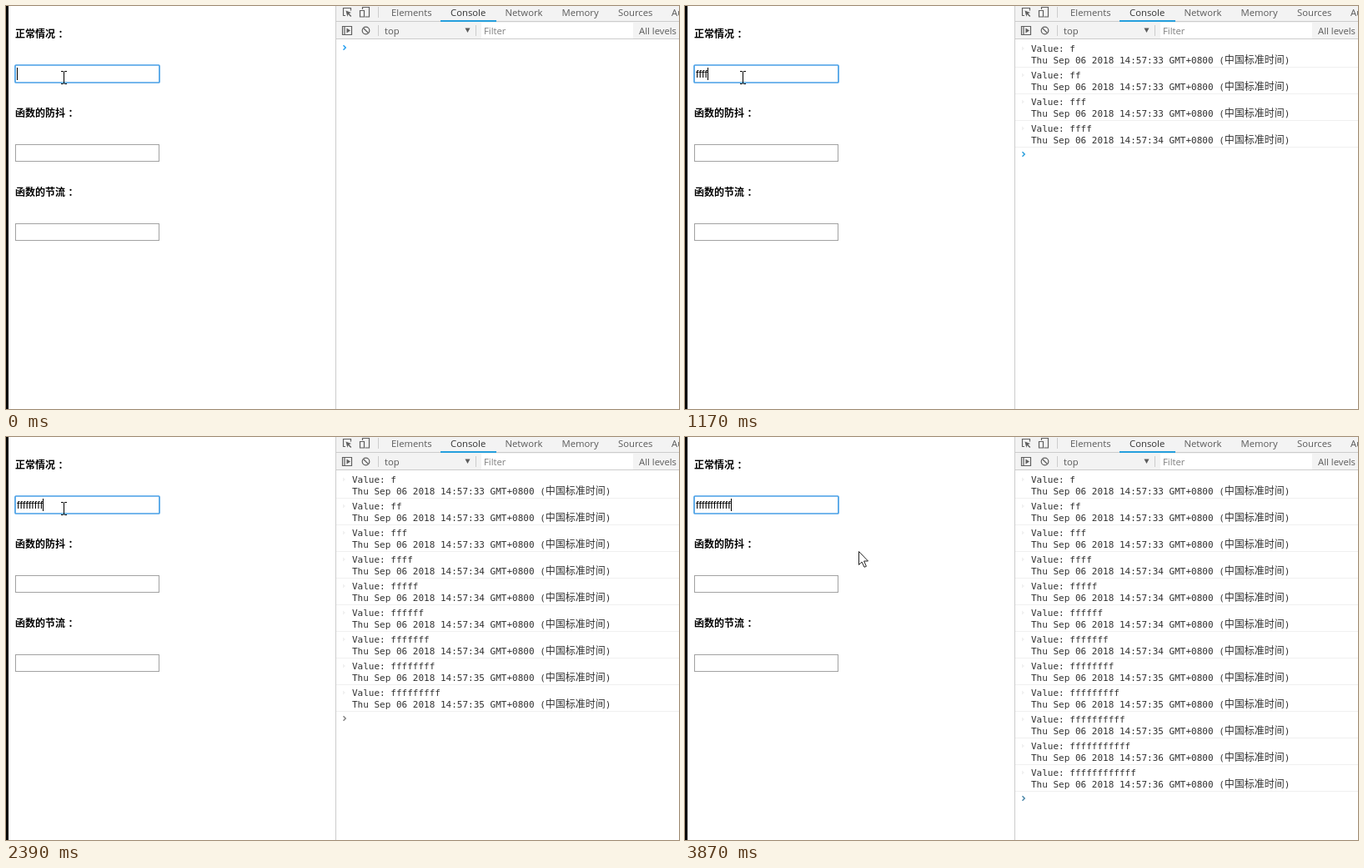
An HTML page that plays this animation: 807x484 px, repeating every 3940 ms.

```html
<!DOCTYPE html>
<html lang="zh-CN">
<head>
<meta charset="utf-8">
<style>
  html, body { margin: 0; width: 100%; height: 100%; overflow: hidden; background: #fff; }
  svg { display: block; }
  text { white-space: pre; }
  .head { font: bold 12px "Noto Sans CJK SC", "Noto Sans CJK", sans-serif; }
  .field { fill: #fff; stroke: #a2a2a2; }
  .ui { font: 11.3px "Open Sans", "Noto Sans", sans-serif; fill: #5a5a5a; }
  .log { font: 11px "DejaVu Sans Mono", monospace; fill: #303030; font-variant-ligatures: none; }
  .zh { font: 12px "Noto Sans CJK SC", "Noto Sans CJK", sans-serif; }
  #typed { font: 12.5px "Liberation Sans", Arial, sans-serif; font-kerning: none; font-variant-ligatures: none; }
  .icon { fill: none; stroke: #5f5f5f; stroke-width: 1.2; }
  .sep { stroke: #ccc; }
</style>
</head>
<body>
<svg id="stage" width="807" height="484" viewBox="0 0 807 484">
  <rect width="3" height="484"/>
  <g id="form"></g>
  <rect x="11" y="71" width="173" height="21" rx="1" fill="#fff" stroke="#479fe6" stroke-width="1.7"/>
  <text id="typed" x="13" y="86"></text>
  <path id="caret" d="M13.5 74v15" stroke="#000"/>

  <rect x="396" width="411" height="39" fill="#f3f3f3"/>
  <rect x="570" y="20" width="182" height="19" fill="#fff"/>
  <path class="sep" d="M395.5 0v484M396 18.5h411M396 39.5h411M446.5 1v13M446.5 23v13M563.5 23v13"/>
  <rect x="521" y="17" width="67" height="2" fill="#259fdd"/>
  <g id="tabs"></g>
  <path d="M550.5 26.5h6l-3 5.5z" fill="#5a5a5a"/>
  <g class="icon">
    <path d="M407 11.5h-2.5v-9h9v3"/>
    <path d="M407.5 5.5l6.5 2.6-2.7 1 3 3-1 1-3-3-1 2.6z" fill="#5f5f5f" stroke="none"/>
    <path d="M427.5 4v-2.5h8v11.5h-5M424.5 5.5h5v7.500h-5z"/>
    <path d="M403.5 24.500h11v10h-11zM406 25v9"/>
    <path d="M408.500 26.500l4.500 3-4.500 3z" fill="#5f5f5f" stroke="none"/>
    <circle cx="431.500" cy="29.500" r="4.300"/>
    <path d="M428.500 26.500l6 6"/>
  </g>
  <g id="rows"></g>
  <path id="prompt" d="M404.500 47.300l2.700 2.700-2.700 2.700" fill="none" stroke-width="1.500"/>

  <path id="beam" d="M66 78.500h3M70 78.500h3M69.500 79v14M66 93.500h3M70 93.500h3" stroke="#000"/>
  <path id="arrow" d="M.5 .5v16l3.600-3.400 2.900 6.200 2.400-1-2.800-6.300h4.900z" fill="#fff" stroke="#222"/>
</svg>
<script>
const $ = id => document.getElementById(id);
const LOOP = 3940;
const keyTimes = [150, 470, 700, 1170, 1470, 1700, 1930, 2160, 2390, 2860, 3260, 3560];
const firstLog = 250, leave = 3790, arrive = 3870;
const seconds = [33, 33, 33, 34, 34, 34, 34, 35, 35, 35, 36, 36];
const promptColors = ["#259ff0", "#259ff0", "#3f78a8", "#3f78a8", "#2a9fdc", "#2a9fdc",
  "#858585", "#858585", "#858585", "#858585", "#5a9a98", "#5a9a98", "#4b87a8"];

$("form").innerHTML = ["正常情况", "函数的防抖", "函数的节流"].map((label, i) => `
  <text class="head" x="11" y="${38 + 95 * i}">${label}<tspan dx="3.500">：</tspan></text>
  <rect class="field" x="11.500" y="${71.5 + 95 * i}" width="172" height="20"/>`).join("");

const uiText = (x, y, text, color = "#5a5a5a") =>
  `<text class="ui" x="${x}" y="${y}" style="fill:${color}">${text}</text>`;
$("tabs").innerHTML =
  uiText(462, 12, "Elements") + uiText(533, 12, "Console", "#333") +
  uiText(598.5, 12, "Network") + uiText(666.5, 12, "Memory") +
  uiText(734, 12, "Sources") + uiText(798, 12, "Audits") +
  uiText(454, 34, "top") + uiText(573, 34, "Filter", "#808080") + uiText(759, 34, "All levels");

$("rows").innerHTML = seconds.map((sec, i) => `
  <g transform="translate(0 ${32 * i})">
    <path d="M404 48.500l3 2.500-3 2.500z" fill="#f0f0f0"/>
    <text class="log" x="415" y="55">Value: ${"f".repeat(i + 1)}</text>
    <text class="log" x="415" y="69">Thu Sep 06 2018 14:57:${sec} GMT+0800 (<tspan class="zh">中国标准时间</tspan>)</text>
    <path d="M396 73.500h411" stroke="#f0f0f0"/>
  </g>`).join("");
const rows = [...$("rows").children];

const show = (el, on) => el.style.display = on ? "" : "none";

function draw(now) {
  const t = now % LOOP;
  const typed = keyTimes.filter(k => t >= k).length;
  const logged = t < firstLog ? 0 : typed;

  $("typed").textContent = "f".repeat(typed);
  $("caret").setAttribute("transform", `translate(${Math.round(3.47 * typed)} 0)`);
  rows.forEach((row, i) => show(row, i < logged));
  $("prompt").setAttribute("transform", `translate(0 ${32 * logged})`);
  $("prompt").setAttribute("stroke", promptColors[logged]);

  show($("beam"), t < leave);
  show($("arrow"), t >= leave);
  $("arrow").setAttribute("transform", t < arrive ? "translate(139 108)" : "translate(208 137)");
  requestAnimationFrame(draw);
}
draw(performance.now());
</script>
</body>
</html>
```
